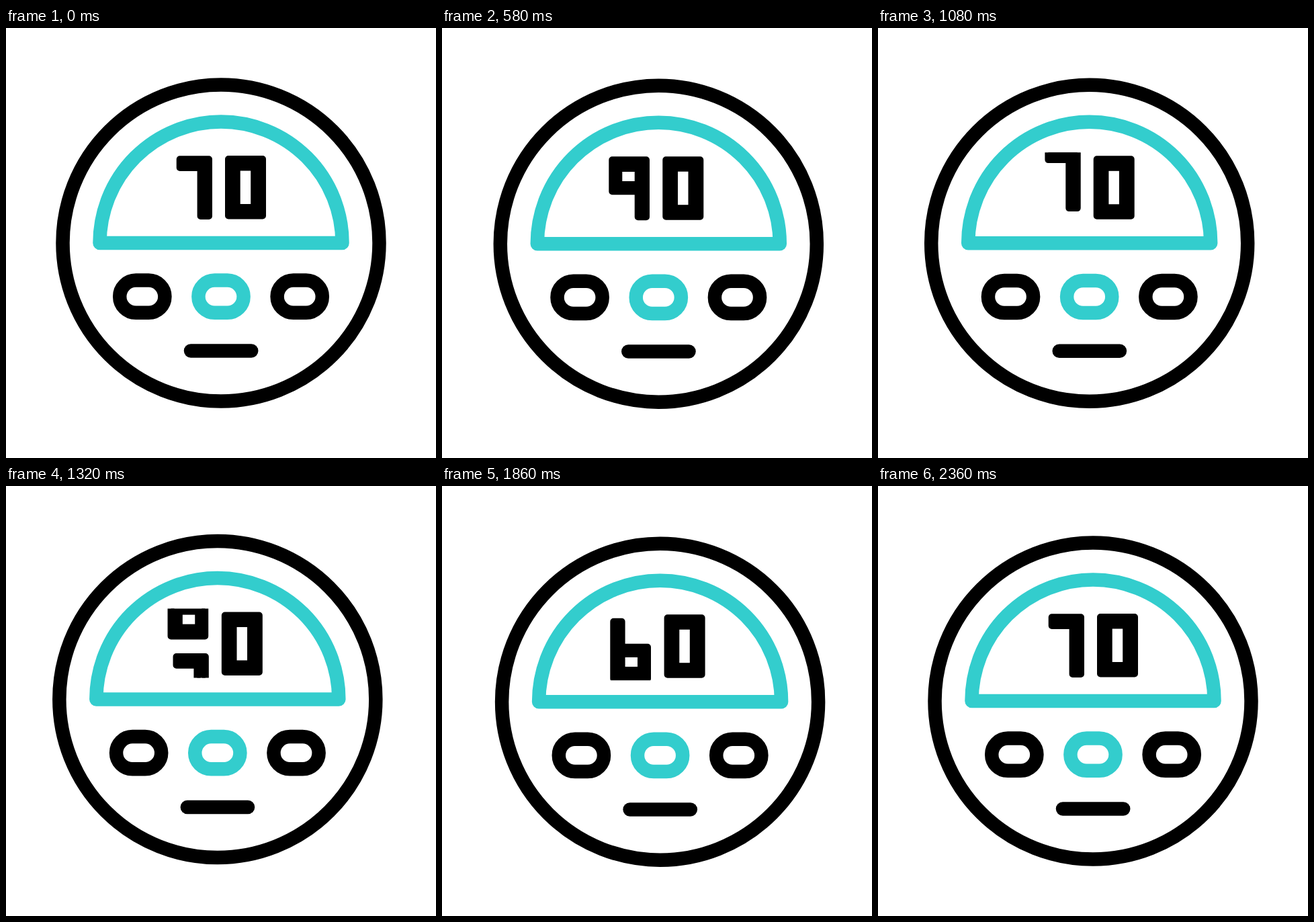
Recreate the animation shown at these times as an HTML page. Size 640 by 640 pixels, loop 2400 ms.

```html
<!DOCTYPE html>
<html lang="en">
<head>
<meta charset="utf-8">
<title>Round meter</title>
<style>
html, body { margin: 0; width: 100%; height: 100%; overflow: hidden; background: #fff; }
svg { display: block; width: 100vw; height: 100vh; }
.line { fill: none; stroke: #000; stroke-width: 20.5; stroke-linecap: round; stroke-linejoin: round; }
.teal { stroke: #33cdcd; }
.digit { stroke: #000; stroke-width: 10; stroke-linejoin: round; }
.hole { fill: #fff; }
</style>
</head>
<body>
<svg viewBox="0 0 640 640">
  <defs>
    <clipPath id="window"><rect x="236" y="185" width="80" height="103"/></clipPath>
    <g id="nine">
      <path class="digit" d="M251 195H301.7V280H289.4V242H251Z"/>
      <rect class="hole" x="266" y="212.8" width="18.4" height="14"/>
    </g>
  </defs>
  <g id="meter">
    <circle class="line" cx="320" cy="320" r="235.5"/>
    <path class="line teal" d="M139.5 320A180.5 180.5 0 0 1 500.5 320Z"/>
    <rect class="line" x="169.2" y="375.6" width="67.2" height="48.2" rx="24.1"/>
    <rect class="line teal" x="286.4" y="375.6" width="67.2" height="48.2" rx="24.1"/>
    <rect class="line" x="403.6" y="375.6" width="67.2" height="48.2" rx="24.1"/>
    <path class="line" d="M275 480.4H365.2"/>
    <path class="digit" d="M331 195H382V279.5H331Z"/>
    <rect class="hole" x="348.7" y="212.5" width="15.5" height="49.5"/>
    <g clip-path="url(#window)">
      <g id="strip">
        <use href="#nine" transform="translate(0 -115) rotate(180 276.2 237.4)"/>
        <path class="digit" d="M258.7 195.3H302V280H289.6V208H258.7Z"/>
        <g transform="translate(0 115)">
          <path class="digit" d="M250.6 195H301.6V280H250.6Z"/>
          <rect class="hole" x="268.5" y="212.4" width="15.3" height="14"/>
          <rect class="hole" x="268.5" y="248.4" width="15.3" height="14"/>
        </g>
        <use href="#nine" transform="translate(0 230)"/>
      </g>
    </g>
  </g>
</svg>
<script>
const LOOP = 2400, END = 2360, SWAY = 1180, STEP = 20;
const meter = document.getElementById("meter");
const strip = document.getElementById("strip");

// Smooth curve through [time, value] points, flat at every peak and dip.
function curve(points) {
  const n = points.length - 1;
  const slope = i => (points[i + 1][1] - points[i][1]) / (points[i + 1][0] - points[i][0]);
  const tangent = i => {
    const a = slope(i ? i - 1 : n - 1), b = slope(i < n ? i : 0);
    return a * b > 0 ? 2 * a * b / (a + b) : 0;
  };
  const tangents = points.map((_, i) => tangent(i));
  return t => {
    let i = 0;
    while (i < n - 1 && t >= points[i + 1][0]) i++;
    const [t0, v0] = points[i], [t1, v1] = points[i + 1];
    const d = t1 - t0, u = (t - t0) / d, w = 1 - u;
    return v0 * w * w * (1 + 2 * u) + v1 * u * u * (3 - 2 * u)
      + d * u * w * (tangents[i] * w - tangents[i + 1] * u);
  };
}

const swayX = curve([[0, 0], [200, -6.6], [280, -5.6], [400, -4.4], [540, 0.9],
  [580, 2.3], [680, 4.6], [740, 4.9], [980, -4.7], [1030, -6.6], [1080, -5.3], [1180, 0]]);
const swayY = curve([[0, 0], [170, -2.7], [280, -1], [400, 1.6], [490, 2.6],
  [580, 1.2], [630, 0.9], [680, 1.2], [850, 3.7], [990, 2.7], [1080, 0.3], [1180, 0]]);
const scroll = curve([[0, 0], [280, 65], [580, 230], [1080, 12.2], [1580, -115],
  [1730, -127], [1860, -120.8], [2360, 0]]);

function draw(now) {
  const t = Math.min(Math.floor(now % LOOP / STEP) * STEP, END);
  const s = t % SWAY;
  meter.setAttribute("transform", `translate(${swayX(s).toFixed(2)} ${swayY(s).toFixed(2)})`);
  strip.setAttribute("transform", `translate(0 ${(-scroll(t)).toFixed(2)})`);
}

function tick() {
  draw(performance.now());
  requestAnimationFrame(tick);
}
draw(0);
tick();
</script>
</body>
</html>
```
